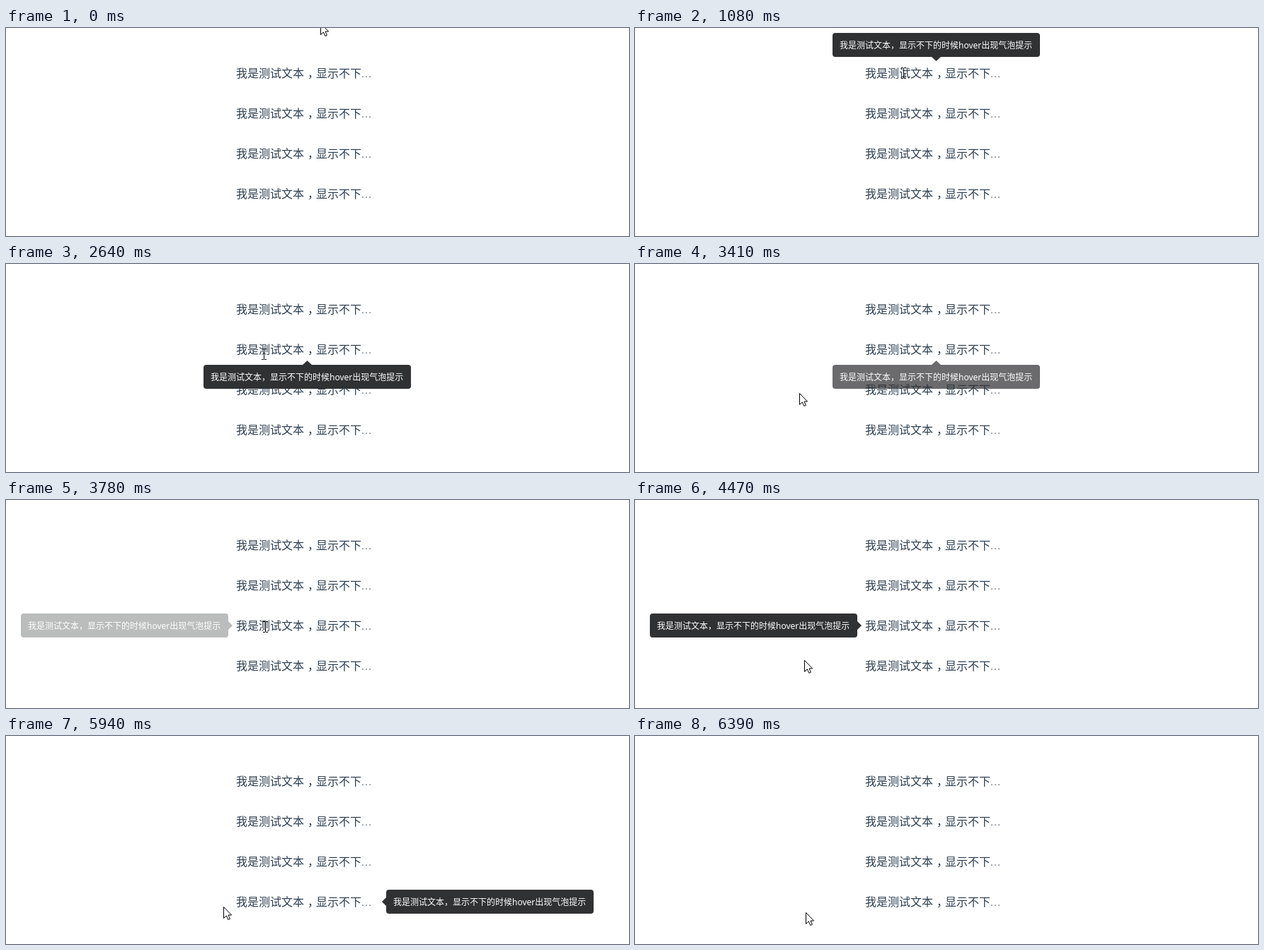
An HTML page that plays this animation: 880x295 px, repeating every 6.64 s.

```html
<!DOCTYPE html>
<html lang="zh-CN">
<head>
<meta charset="utf-8">
<title>Tooltip demo</title>
<style>
html, body { margin: 0; height: 100%; overflow: hidden; background: #fff; }
svg { display: block; }
text { font-family: "Noto Sans", "Noto Sans CJK SC", "Noto Sans CJK", sans-serif; white-space: pre; }
.row { font-size: 16px; font-weight: 300; fill: #2c3e50; }
.dots { font-family: "Liberation Sans", sans-serif; fill-opacity: .65; }
.tip { fill: #303133; }
.tip text { font-size: 12px; fill: #fff; }
</style>
</head>
<body>
<svg width="880" height="295" viewBox="0 0 880 295">
  <g id="rows"></g>
  <g id="tips"></g>
  <g id="cursor">
    <path id="arrow" d="M.5 .5V16.5L4.3 12.9 6.8 18.5 9.4 17.4 7 12H11.6Z" fill="#fff" stroke="#000"/>
    <path id="beam" d="M-3 -7.5H0M1 -7.5H4M.5 -7V7M-3 7.5H0M1 7.5H4" fill="none" stroke="#000"/>
  </g>
</svg>
<script>
const LOOP = 6640, STEP = 78, FADE = 200, HIDE_DELAY = 255;
const $ = id => document.getElementById(id);
const clamp = v => Math.max(0, Math.min(1, v));

const rowY = [0, 1, 2, 3].map(i => 64 + 57 * i);
$('rows').innerHTML = rowY.map(y => `<text class="row" y="${y + 6}">
  <tspan x="325">我是测试文本</tspan><tspan x="426">，</tspan><tspan x="438">显示不下</tspan><tspan x="501" class="dots">…</tspan></text>`).join('');

// Each bubble sits on one side of its row
const tips = [
  { x: 279, y: 7, arrow: 'M140 34h13l-6.5 6z' },
  { x: 279, y: 143, arrow: 'M140 0h13l-6.5 -6z' },
  { x: 21, y: 161, arrow: 'M293 11v12l6 -6z' },
  { x: 537, y: 218, arrow: 'M0 11v12l-6 -6z' }
];
$('tips').innerHTML = tips.map(p => `<g class="tip" transform="translate(${p.x} ${p.y})">
  <rect width="293" height="34" rx="4"/><path d="${p.arrow}"/>
  <text x="10" y="22">我是测试文本，显示不下的时候hover出现气泡提示</text></g>`).join('');
const tipNodes = [...$('tips').children];

// Cursor trips, evenly paced along their points; trip i reveals bubble i and dismisses the one before
const trips = [
  { start: 520, end: 1080, show: 840, points: [[444, -7], [410, 34], [388, 58], [378, 64]] },
  { start: 1940, end: 2560, show: 2440, points: [[378, 64], [268, 96], [315, 113], [364, 128]] },
  { start: 3100, end: 3700, show: 3660, points: [[364, 128], [205, 168], [242, 188], [366, 180]] },
  { start: 4240, end: 4870, show: 4730, points: [[366, 180], [225, 223], [270, 235], [365, 237]] },
  { start: 5710, end: 6390, show: LOOP, points: [[365, 237], [325, 240], [250, 248], [239, 250]] }
];

function along(points, k) {
  const pos = clamp(k) * (points.length - 1);
  const i = Math.min(Math.floor(pos), points.length - 2);
  return points[i].map((v, axis) => Math.round(v + (points[i + 1][axis] - v) * (pos - i)));
}

function draw(now) {
  const time = now % LOOP + 14;
  const trip = trips.filter(p => p.start <= time).pop() || trips[0];
  const t = trip.start + Math.floor((time - trip.start) / STEP) * STEP;

  tipNodes.forEach((node, i) => {
    const hide = trips[i + 1].start + HIDE_DELAY;
    node.style.opacity = clamp((t - trips[i].show) / FADE) - clamp((t - hide) / FADE);
  });

  const [x, y] = along(trip.points, (t - trip.start + STEP) / (trip.end - trip.start + STEP));
  const overText = x >= 325 && x <= 517 && rowY.some(r => Math.abs(y - r) <= 10);
  $('cursor').setAttribute('transform', `translate(${x} ${y})`);
  $('beam').style.display = overText ? '' : 'none';
  $('arrow').style.display = overText ? 'none' : '';
}

const start = performance.now();
function loop() {
  draw(performance.now() - start);
  requestAnimationFrame(loop);
}
loop();
</script>
</body>
</html>
```
